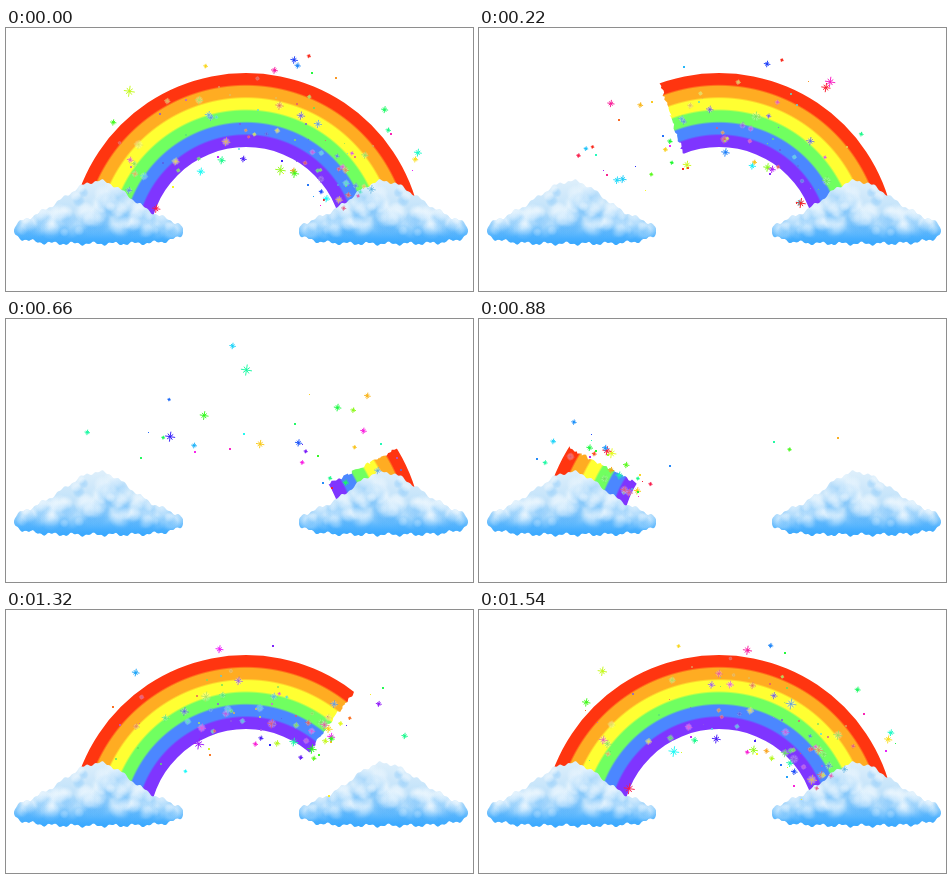
Write an HTML page with a canvas that moves like this. It is 467 px wide and 263 px high and loops after 1.65 s.

```html
<!DOCTYPE html>
<html lang="en">
<head>
<meta charset="utf-8">
<title>Rainbow</title>
<style>
html, body { margin: 0; width: 100%; height: 100%; overflow: hidden; background: #fff; }
canvas { display: block; width: 467px; height: 263px; }
</style>
</head>
<body>
<canvas id="stage" width="467" height="263"></canvas>
<script>
const ctx = document.getElementById('stage').getContext('2d');
const STEP = 110, STEPS = 15, ERASE_STEPS = 7;
const CX = 240, END = 76;
const OUTER = { y: 222, r: 177 }, INNER = { y: 216, r: 97 };
const BANDS = ['#7f35ff', '#4b87ff', '#70ff60', '#ffff32', '#ffac22', '#ff3510'];

const clamp = (v, lo, hi) => Math.max(lo, Math.min(hi, v));

function random(seed) {
  let s = seed * 2654435761 >>> 0;
  return () => {
    s = s + 0x6D2B79F5 >>> 0;
    let t = Math.imul(s ^ s >>> 15, s | 1);
    t ^= t + Math.imul(t ^ t >>> 7, t | 61);
    return ((t ^ t >>> 14) >>> 0) / 4294967296;
  };
}

function polar(angle, radius) {
  const a = angle * Math.PI / 180;
  return [CX + Math.sin(a) * radius, OUTER.y - Math.cos(a) * radius];
}

// The rainbow is erased from the left at constant speed, then redrawn, slowing down.
function visibleArc(step) {
  if (step < ERASE_STEPS) return [step ? 19.5 * (step - 3) : -END, END];
  const s = step - 8;
  return [-END, clamp(-58 + 26.1 * s - 0.56 * s * s, -END, END)];
}

// Slightly ragged line across the bands, from the inside out.
function cutLine(angle, rnd) {
  const [x, y] = polar(angle, OUTER.r);
  const pivot = Math.max(208, 238 - 38 * (angle / 65) ** 2);
  const points = [];
  for (let t = 0.3; t < 1.3; t += 0.012) {
    points.push([CX + (x - CX) * t + (rnd() - 0.5) * 3, pivot + (y - pivot) * t + (rnd() - 0.5) * 3]);
  }
  return points;
}

function drawRainbow(from, to, step) {
  if (to <= from) return;
  const rnd = random(step + 1);
  const rim = [];
  for (let a = from; a < to; a += 3) rim.push(polar(a, 240));
  ctx.save();
  ctx.beginPath();
  [...cutLine(from, rnd), ...rim, ...cutLine(to, rnd).reverse()].forEach(p => ctx.lineTo(...p));
  for (let a = to; a > from; a -= 3) ctx.lineTo(...polar(a, 60));
  ctx.clip();

  const bands = ctx.createRadialGradient(CX, INNER.y, INNER.r, CX, OUTER.y, OUTER.r);
  BANDS.forEach((color, i) => {
    bands.addColorStop(clamp(i / 6 + 0.014, 0, 1), color);
    bands.addColorStop(clamp((i + 1) / 6 - 0.014, 0, 1), color);
  });
  ctx.fillStyle = bands;
  ctx.beginPath();
  ctx.arc(CX, OUTER.y, OUTER.r, 0, Math.PI * 2);
  ctx.closePath();
  ctx.moveTo(CX + INNER.r, INNER.y);
  ctx.arc(CX, INNER.y, INNER.r, 0, Math.PI * 2);
  ctx.fill('evenodd');
  ctx.restore();
}

const ripple = x => Math.sin(x * 0.31) * 1.3 + Math.sin(x * 0.83) * 0.8;

// Cloud outline: a flat base with one hump, steeper on its right side.
function cloudTop(x) {
  const u = (x - 92.5) / 84.5;
  const hump = Math.exp(-(((x - 93) / (x < 93 ? 47 : 42)) ** 2));
  return 202 - 11 * Math.sqrt(Math.max(0, 1 - u ** 4)) - 38 * hump + ripple(x);
}

function cloudBottom(x) {
  const u = (x - 92.5) / 84.5;
  return 204 + 11.5 * Math.sqrt(Math.max(0, 1 - u ** 4)) + ripple(x + 9);
}

function softDisc(x, y, r, rgb, alpha) {
  const g = ctx.createRadialGradient(x, y, 0, x, y, r);
  g.addColorStop(0, `rgba(${rgb},${alpha})`);
  g.addColorStop(0.55, `rgba(${rgb},${alpha * 0.7})`);
  g.addColorStop(1, `rgba(${rgb},0)`);
  ctx.fillStyle = g;
  ctx.beginPath();
  ctx.arc(x, y, r, 0, Math.PI * 2);
  ctx.fill();
}

function drawCloud(mirrored) {
  const rnd = random(12);
  ctx.save();
  if (mirrored) ctx.transform(-1, 0, 0, 1, 470, 0);
  ctx.beginPath();
  for (let x = 8; x <= 177; x++) ctx.lineTo(x, cloudTop(x));
  for (let x = 177; x >= 8; x--) ctx.lineTo(x, cloudBottom(x));
  ctx.clip();
  const sky = ctx.createLinearGradient(0, 152, 0, 217);
  sky.addColorStop(0, '#deeffb');
  sky.addColorStop(0.5, '#bfe1fa');
  sky.addColorStop(0.75, '#8fcdfc');
  sky.addColorStop(1, '#3ba8ff');
  ctx.fillStyle = sky;
  ctx.fillRect(0, 140, 190, 90);
  for (let i = 0; i < 70; i++) {
    const x = 12 + rnd() * 160, top = cloudTop(x);
    const y = top + rnd() * (206 - top), r = 5 + rnd() * 8;
    softDisc(x + 2, y + r * 0.6, r, '95,182,250', 0.32);
    softDisc(x - 1, y - r * 0.2, r * 0.9, '245,251,255', 0.5);
  }
  const shade = ctx.createLinearGradient(0, 196, 0, 217);
  shade.addColorStop(0, 'rgba(55,168,255,0)');
  shade.addColorStop(1, 'rgba(55,168,255,.8)');
  ctx.fillStyle = shade;
  ctx.fillRect(0, 196, 190, 30);
  ctx.restore();
}

function drawSpark(x, y, size, color, glowing) {
  if (size < 1.6) {
    ctx.fillStyle = color;
    ctx.fillRect(Math.round(x), Math.round(y), size > 1 ? 2 : 1, size > 1 ? 2 : 1);
    return;
  }
  if (glowing) softDisc(x, y, size, '255,255,255', 0.45);
  ctx.strokeStyle = color;
  ctx.lineWidth = 1;
  ctx.beginPath();
  for (let i = 0; i < 4; i++) {
    const a = i * Math.PI / 4 + 0.15, r = i % 2 ? size * 0.75 : size;
    const dx = Math.cos(a) * r, dy = Math.sin(a) * r;
    ctx.moveTo(x - dx, y - dy);
    ctx.lineTo(x + dx, y + dy);
  }
  ctx.stroke();
}

// Each spark lives three steps: it flares up, fades and is reborn elsewhere.
function drawSparks(step, from, to) {
  const count = 24 + 80 * (to - from) / (2 * END);
  const reach = step < ERASE_STEPS ? 66 : Math.min(66, to + 9);
  for (let i = 0; i < count; i++) {
    const age = (step + i) % 3, born = (step - age + STEPS) % STEPS;
    const rnd = random(i * 31 + born * 977 + 5);
    const stray = rnd() < 0.18, u = rnd();
    const angle = stray ? -66 + 132 * u : -66 + (reach + 66) * u ** 0.6;
    const radius = rnd() < 0.12 ? 180 + rnd() * 25 : 88 + rnd() * 86;
    const [x, y] = polar(angle, radius);
    const onBand = angle > from && angle < to && radius > 102 && radius < 175;
    const size = (rnd() < 0.4 ? 1.2 : 2.2 + rnd() * 3.4) * [0.85, 1, 0.75][age];
    const hue = rnd() * 360;
    const color = onBand ? `hsla(${hue},70%,62%,.75)` : `hsla(${hue},95%,54%,.95)`;
    drawSpark(x, y + age * 2, size, color, onBand);
  }
}

function render(step) {
  const [from, to] = visibleArc(step);
  ctx.fillStyle = '#fff';
  ctx.fillRect(0, 0, 467, 263);
  drawRainbow(from, to, step);
  drawCloud(false);
  drawCloud(true);
  drawSparks(step, from, to);
}

const start = performance.now();
function tick() {
  render(Math.floor((performance.now() - start) / STEP) % STEPS);
  requestAnimationFrame(tick);
}
tick();
</script>
</body>
</html>
```
